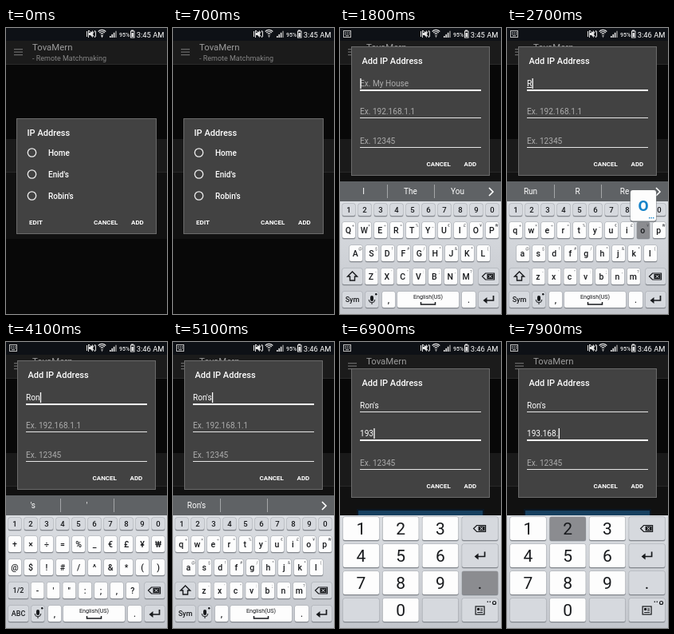
An HTML page with a canvas for the animation above (8000 ms loop, 202 by 358 pixels).

```html
<!DOCTYPE html>
<html lang="en">
<head>
<meta charset="utf-8">
<title>Add IP Address</title>
<style>
html, body { margin: 0; width: 100%; height: 100%; overflow: hidden; background: #000; }
canvas { display: block; width: 202px; height: 358px; }
</style>
</head>
<body>
<canvas id="stage"></canvas>
<script>
const W = 202, H = 358, LOOP = 8000;
const canvas = document.getElementById('stage');
const c = canvas.getContext('2d');
const dpr = window.devicePixelRatio || 1;
canvas.width = W * dpr;
canvas.height = H * dpr;

const INK = '#17191c';
const clamp = v => Math.max(0, Math.min(1, v));
const ease = (t, a, b) => { const p = clamp((t - a) / (b - a)); return p * p * (3 - 2 * p); };

function rect(x, y, w, h, color) {
  c.fillStyle = color;
  c.fillRect(x, y, w, h);
}
function round(x, y, w, h, r, color) {
  c.fillStyle = color;
  c.beginPath();
  c.roundRect(x, y, w, h, r);
  c.fill();
}
function text(s, x, y, size, color, weight = 400, align = 'left') {
  c.font = `${weight} ${size}px Roboto, sans-serif`;
  c.textAlign = align;
  c.fillStyle = color;
  c.fillText(s, x, y);
  return c.measureText(s).width;
}
function line(points, color, width = 1, close = false) {
  c.strokeStyle = color;
  c.lineWidth = width;
  c.beginPath();
  points.forEach(([x, y]) => c.lineTo(x, y));
  if (close) c.closePath();
  c.stroke();
}
function shape(points, color) {
  c.fillStyle = color;
  c.beginPath();
  points.forEach(([x, y]) => c.lineTo(x, y));
  c.fill();
}
function arc(x, y, r, from, to, color, width) {
  c.strokeStyle = color;
  c.lineWidth = width;
  c.beginPath();
  c.arc(x, y, r, from, to);
  c.stroke();
}
function cross(x, y, r, color, width) {
  line([[x - r, y - r], [x + r, y + r]], color, width);
  line([[x + r, y - r], [x - r, y + r]], color, width);
}

// Key presses: [down, up, keyboard, key label]; the text changes on release.
const presses = [
  [2200, 2400, 'upper', 'R'], [2600, 2800, 'lower', 'o'], [2960, 3080, 'lower', 'n'],
  [3450, 3600, 'lower', 'Sym'], [4350, 4500, 'sym', "'"], [4900, 5050, 'lower', 's'],
  [5200, 5300, 'lower', 'enter'], [5950, 6100, 'num', '1'], [6250, 6400, 'num', '9'],
  [6550, 6700, 'num', '3'], [6850, 7000, 'num', '.'], [7100, 7220, 'num', '1'],
  [7300, 7420, 'num', '6'], [7480, 7600, 'num', '8'], [7680, 7800, 'num', '.'],
  [7880, 8000, 'num', '2']
];
const NEXT = 5300;

function typed(t, numeric) {
  return presses
    .filter(p => p[1] <= t && p[3].length === 1 && (p[2] === 'num') === numeric)
    .map(p => p[3]).join('');
}
function cursorOn(t) {
  const edits = presses.filter(p => p[1] <= t && p[3] !== 'Sym');
  const last = edits.length ? edits.at(-1)[1] : 1700;
  return (t - last) % 1000 < 500;
}

// Keyboards
const key = (label, x, y, w, h, tone = 'light', size = 10.5, hint = '') => ({ label, x, y, w, h, tone, size, hint });

const letters = ['qwertyuiop', 'asdfghjkl', 'zxcvbnm'];
const symbols = ['+×÷=%_€£¥₩', '@$!#/^&*()', '-\'":;,?'];

function fullKeys(rows, left, mode, rowTwoX) {
  const keys = [...'1234567890'].map((d, i) => key(d, 3 + i * 20, 220, 16, 15, 'mid', 9.5));
  const starts = [3, rowTwoX, 31.5];
  const hinted = rows !== symbols;
  rows.forEach((row, r) => [...row].forEach((ch, i) => keys.push(
    key(ch, starts[r] + i * (r === 2 ? 19.9 : 20), 243 + r * 29, 16, 20, 'light', 10.5, hinted ? symbols[r][i] : ''))));
  keys.push(
    key(left, 3, 301, 25, 20, 'mid', 9), key('back', 174, 301, 25, 20, 'mid'),
    key(mode, 3, 330, 25, 20, 'mid', 9), key('mic', 32, 330, 16, 20, 'mid'),
    key(',', 53, 330, 16, 20), key('space', 72, 330, 77, 20),
    key('.', 153, 330, 17, 20), key('enter', 174, 330, 25, 20, 'mid'));
  return keys;
}
function numKeys() {
  const grid = [['1', '2', '3', 'back'], ['4', '5', '6', 'enter'], ['7', '8', '9', '.'], ['', '0', '', 'clip']];
  return grid.flatMap((row, r) => row.map((label, i) =>
    key(label, 4 + i * 49.7, 219 + r * 34, 45, 29, /\d/.test(label) ? 'light' : 'mid', 21)));
}
const boards = {
  upper: fullKeys(letters.map(r => r.toUpperCase()), 'shift', 'Sym', 12),
  lower: fullKeys(letters, 'shift', 'Sym', 12),
  sym: fullKeys(symbols, '1/2', 'ABC', 3),
  num: numKeys()
};

const icons = {
  back(x, y) {
    line([[x - 8, y], [x - 4, y - 4], [x + 7, y - 4], [x + 7, y + 4], [x - 4, y + 4]], INK, 1.2, true);
    rect(x - 2, y - 3, 8, 6, INK);
    cross(x + 2, y, 1.8, '#e4e6ea', 1);
  },
  enter(x, y) {
    line([[x + 6, y - 5], [x + 6, y + 1], [x - 4, y + 1]], INK, 1.7);
    shape([[x - 7, y + 1], [x - 2, y - 3], [x - 2, y + 5]], INK);
  },
  shift(x, y) {
    line([[x, y - 6], [x + 6, y], [x + 3, y], [x + 3, y + 5], [x - 3, y + 5], [x - 3, y], [x - 6, y]], INK, 1.4, true);
  },
  mic(x, y) {
    round(x - 2, y - 5, 4, 7, 2, INK);
    arc(x, y, 3.8, 0, Math.PI, INK, 1);
    line([[x, y + 4], [x, y + 6]], INK);
    round(x + 4, y - 8, 2.5, 2.5, 1.2, INK);
  },
  space(x, y) {
    text('English(US)', x, y - 1, 7.2, INK, 400, 'center');
    line([[x - 9, y + 3], [x - 9, y + 6], [x + 9, y + 6], [x + 9, y + 3]], INK, 1.5);
  },
  clip(x, y) {
    c.strokeStyle = INK;
    c.lineWidth = 1.2;
    c.strokeRect(x - 5.5, y - 4.5, 11, 10);
    rect(x - 3.5, y - 2.5, 3, 3, INK);
    for (const dy of [-2, 0, 2.5]) rect(x + (dy > 1 ? -3.5 : 0.5), y + dy, dy > 1 ? 7 : 3, 1, INK);
    for (const dx of [9, 12]) rect(x + dx, y - 11, 1.4, 1.4, INK);
    arc(x + 18, y - 9, 2, 0, 7, INK, 1.2);
  }
};

function drawKey(k, down) {
  const cx = k.x + k.w / 2, cy = k.y + k.h / 2;
  round(k.x - 0.5, k.y - 0.5, k.w + 1, k.h + 2, 2.5, '#a4a8ae');
  round(k.x, k.y + 1, k.w, k.h, 2, '#83878d');
  round(k.x, k.y, k.w, k.h, 2, down ? '#8b8c90' : k.tone === 'light' ? '#fdfdfd' : '#d6d9de');
  if (icons[k.label]) icons[k.label](cx, cy);
  else text(k.label, cx - (k.hint ? 0.7 : 0), cy + k.size * 0.34, k.size, INK, k.size > 15 ? 400 : 500, 'center');
  if (k.hint) text(k.hint, k.x + k.w - 2.5, k.y + 6, 5, '#55585d', 400, 'center');
}
function popup(k) {
  const cx = k.x + k.w / 2, x = Math.max(2, Math.min(166, cx - 16)), y = k.y - 40;
  round(x - 0.5, y, 33, 40, 3, '#7d8186');
  round(x, y, 32, 38.5, 3, '#fdfdfd');
  text(k.label.toUpperCase(), x + 16, y + 26, 19, '#1583c9', 700, 'center');
  for (let i = 0; i < 3; i++) rect(x + 23 + i * 2.5, y + 34, 1.4, 1.4, '#1583c9');
}

function suggestions(t) {
  rect(0, 192, W, 25, '#5f6265');
  const word = typed(t, false);
  const wide = t >= 3600 && t < 4500;
  const words = wide ? ["'s", "'"]
    : { '': ['I', 'The', 'You'], R: ['Run', 'R', 'Re'], Ro: ['To', 'Ro', 'So'] }[word] || [word];
  const step = wide ? 67.5 : 59;
  words.forEach((w, i) => text(w, step * (i + 0.5), 208, 10, '#fff', 400, 'center'));
  for (const i of [1, 2]) rect(Math.round(step * i), 196, 1, 17, '#a4a6a8');
  if (!wide) line([[187, 200], [192, 205], [187, 210]], '#fff', 1.6);
}

function keyboard(t) {
  if (t < 1450) return;
  const name = t < 2400 ? 'upper' : t < 3600 ? 'lower' : t < 4500 ? 'sym' : t < 5400 ? 'lower' : 'num';
  const slide = name === 'num' ? 1 - ease(t, 5400, 5600) : 1 - ease(t, 1450, 1750);
  c.save();
  c.translate(0, slide * 168);
  const g = c.createLinearGradient(0, 216, 0, H);
  g.addColorStop(0, '#dcdfe3');
  g.addColorStop(1, '#c3c6cc');
  rect(0, 217, W, 141, g);
  if (name !== 'num') suggestions(t);
  const hit = presses.find(p => p[0] <= t && t < p[1]);
  for (const k of boards[name]) drawKey(k, hit && hit[3] === k.label && hit[2] === name);
  if (hit && name !== 'num' && hit[3].length === 1) popup(boards[name].find(k => k.label === hit[3]));
  c.restore();
}

// Phone screen
function statusBar(t) {
  rect(0, 0, W, 16, '#0e1116');
  const light = '#e4e4e4';
  if (t >= 1200) {
    c.strokeStyle = '#bbb';
    c.lineWidth = 1;
    c.strokeRect(4.5, 3.5, 9, 8);
    for (let i = 0; i < 6; i++) rect(6 + (i % 3) * 2.5, 5 + (i > 2) * 2, 1.3, 1.2, '#bbb');
    rect(7, 9.2, 4, 1, '#bbb');
  }
  rect(101, 4, 1, 7, light);
  rect(103, 3, 1, 9, light);
  shape([[104, 6], [106, 6], [109, 3], [109, 12], [106, 9], [104, 9]], light);
  line([[104, 3], [112, 12]], light);
  line([[112, 3], [108, 8]], light);
  rect(112, 4, 1, 7, light);
  for (const r of [2.2, 4.4, 6.6]) arc(120.5, 9, r, -Math.PI * 0.76, -Math.PI * 0.24, light, 1.2);
  shape([[119, 9], [122, 9], [120.5, 12.5]], t < 100 ? light : '#999');
  for (let i = 0; i < 4; i++) rect(130 + i * 2.4, 10 - i * 2.1, 1.6, 2 + i * 2.1, i < 3 ? light : '#888');
  text('95%', 142, 11, 7, light, 500);
  rect(157, 2.5, 3, 1.5, light);
  c.strokeStyle = light;
  c.lineWidth = 1;
  c.strokeRect(156.5, 4, 4.5, 8);
  rect(157.5, 6, 2.5, 5, light);
  text(t < 1900 ? '3:45 AM' : '3:46 AM', 198.5, 11.5, 9.4, '#fff', 400, 'right');
}
function page() {
  rect(0, 0, W, H, '#080808');
  rect(0, 16, W, 29, '#1b1b1b');
  rect(0, 45, W, 1, '#2a2a2a');
  for (let i = 0; i < 3; i++) rect(10, 26 + i * 3.5, 11, 1.2, '#6a6a6a');
  text('TovaMern', 33, 28, 11.4, '#9c9c9c');
  text('- Remote Matchmaking', 33, 41, 9, '#858585');
  rect(0, 139, W, 42, '#1a1a1a');
  rect(0, 180, W, 1, '#282828');
  rect(0, 181, W, 83, '#111');
  rect(21, 209, 160, 26, '#0a1724');
  rect(23, 211, 156, 22, '#17405f');
}
function panel(x, y, w, h) {
  rect(x, y, w, h, '#6b6b6b');
  rect(x + 1, y + 1, w - 2, h - 2, '#424242');
}
const button = (s, x, y) => text(s, x, y, 8, '#fff', 700);

function listDialog(t) {
  panel(13, 113, 176, 145);
  text('IP Address', 26.5, 135, 11, '#fff', 500);
  ['Home', "Enid's", "Robin's"].forEach((s, i) => {
    const y = 156 + i * 27;
    arc(32.5, y, 5.2, 0, 7, '#eee', 1.3);
    text(s, 53, y + 4, 10, '#fff', 500);
  });
  if (t >= 450 && t < 700) round(150, 234, 30, 18, 2, '#666');
  button('EDIT', 29, 246);
  button('CANCEL', 110, 246);
  button('ADD', 157, 246);
}

function field(value, hint, y, focused, t) {
  const w = text(value || hint, 25, y, 10.1, value ? '#fff' : '#acacac');
  rect(25, y + 4, 152, focused ? 2 : 1, focused ? '#fff' : '#e6e6e6');
  if (!focused) return;
  const end = 25 + (value ? w : 0);
  if (value && t < 3600) rect(25, y + 1, w, 1, '#fff');
  if (t >= 1700 && cursorOn(t)) rect(end + 0.3, y - 10, 1.3, 13, '#fff');
}
function addDialog(t) {
  const top = 105 - 82 * ease(t, 1250, 1550) + 10 * ease(t, 5400, 5600);
  c.save();
  c.translate(0, Math.round(top) - 23);
  panel(14, 23, 174, 162);
  text('Add IP Address', 27.5, 45, 11, '#fff', 500);
  field(typed(t, false), 'Ex. My House', 73, t < NEXT, t);
  field(typed(t, true), 'Ex. 192.168.1.1', 108, t >= NEXT, t);
  field('', 'Ex. 12345', 145, false, t);
  button('CANCEL', 108.5, 173);
  button('ADD', 155.5, 173);
  c.restore();
}

function draw(t) {
  c.setTransform(dpr, 0, 0, dpr, 0, 0);
  page();
  const out = 1 - ease(t, 700, 900), fade = ease(t, 750, 1000);
  if (out > 0) {
    c.globalAlpha = out;
    listDialog(t);
  }
  if (fade > 0) {
    c.globalAlpha = fade;
    addDialog(t);
  }
  c.globalAlpha = 1;
  keyboard(t);
  statusBar(t);
}

let start;
function tick(now) {
  start ??= now;
  draw((now - start) % LOOP);
  requestAnimationFrame(tick);
}
draw(0);
requestAnimationFrame(tick);
</script>
</body>
</html>
```
